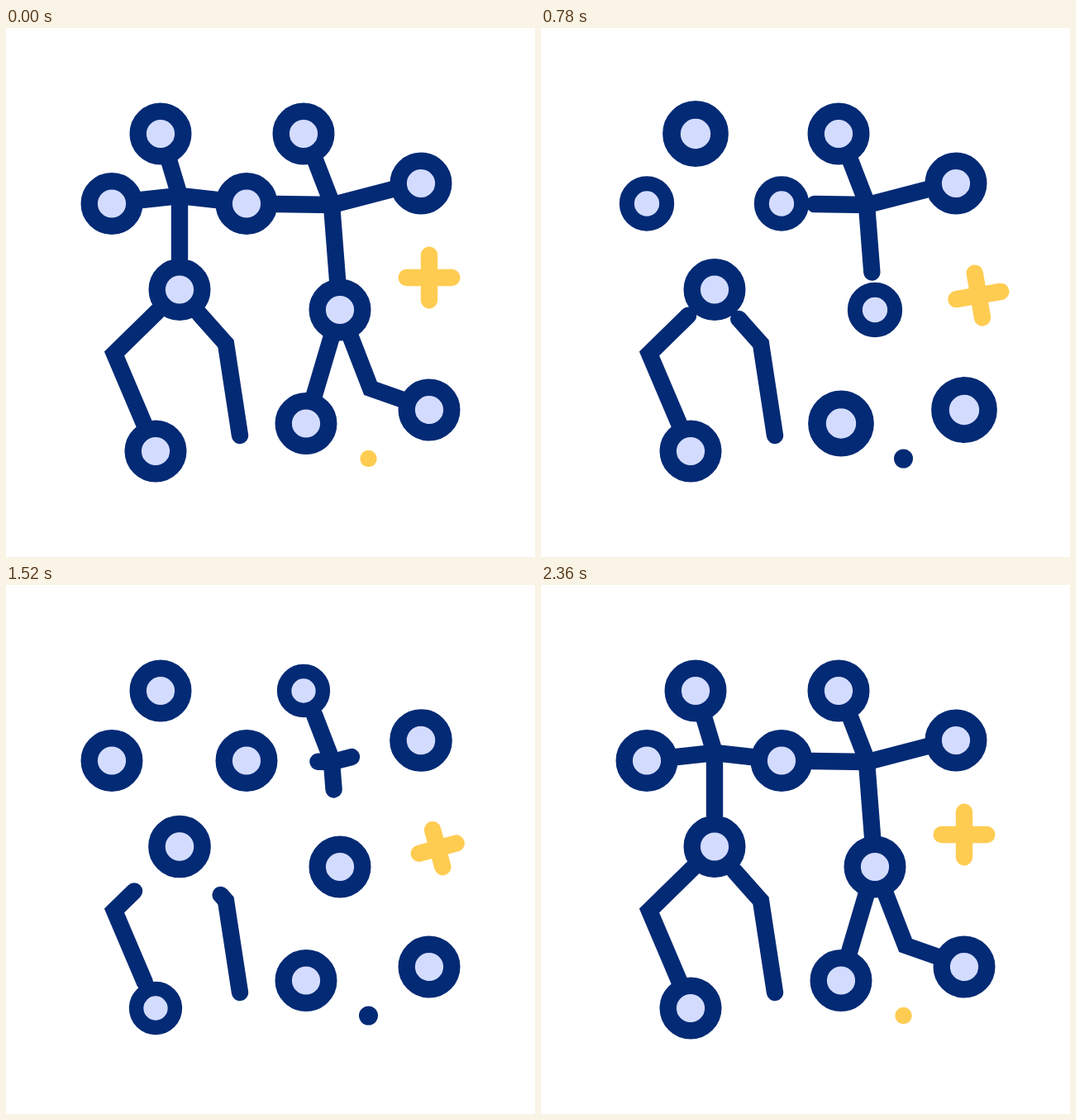
An HTML page for the animation above (3000 ms loop, 640x640 px).

```html
<!DOCTYPE html>
<html lang="en">
<head>
<meta charset="utf-8">
<title>Dancing figures</title>
<style>
  html, body { margin: 0; width: 100%; height: 100%; overflow: hidden; background: #fff; }
  svg { display: block; width: 100%; height: 100%; }
  .limb, .plus { fill: none; stroke-width: 20.4; stroke-linecap: round; stroke-miterlimit: 10; }
  .limb { stroke: #032a75; }
  .plus { stroke: #ffcc52; }
  .node { fill: #d3dcff; stroke: #032a75; stroke-width: 20.4; }
</style>
</head>
<body>
<svg id="stage" viewBox="0 0 640 640"></svg>
<script>
const LOOP = 3000, NAVY = '#032a75', GOLD = '#ffcc52';
const stage = document.getElementById('stage');

function add(tag, attrs, parent = stage) {
  const el = document.createElementNS('http://www.w3.org/2000/svg', tag);
  for (const k in attrs) el.setAttribute(k, attrs[k]);
  if (parent) parent.appendChild(el);
  return el;
}

const smooth = p => p * p * (3 - 2 * p);

// Eased value at time t from [time, value] steps
function track(steps, t) {
  if (t <= steps[0][0]) return steps[0][1];
  for (let i = 1; i < steps.length; i++) {
    const [t0, a] = steps[i - 1], [t1, b] = steps[i];
    if (t < t1) return a + (b - a) * smooth((t - t0) / (t1 - t0));
  }
  return steps[steps.length - 1][1];
}

// Each limb starts at the end that stays; times: retract from/to, grow from/to
const limbs = [
  ['M210 203L196.5 158', [140, 490, 2030, 2360]],
  ['M210 203L164 208', [190, 490, 2020, 2350]],
  ['M210 203L255 208', [190, 490, 2020, 2350]],
  ['M210 279V203', [430, 760, 1745, 2040]],
  ['M168 481L131 394L184 342', [733, 1093, 1267, 1640]],
  ['M283 493L266 382L234 346', [733, 1093, 1267, 1640]],
  ['M373 157L395 214', [930, 1110, 1200, 1420]],
  ['M395 214L328 213', [750, 1000, 1405, 1750]],
  ['M395 214L468 195', [750, 1000, 1390, 1740]],
  ['M394 214L401 304', [730, 1000, 1310, 1820]],
  ['M394 373L373 444', [140, 540, 1745, 2260]],
  ['M417 374L441 436L478 449', [140, 540, 1745, 2260]]
].map(([d, [a, b, c, e]]) => ({
  el: add('path', { class: 'limb', d, pathLength: 1 }),
  steps: [[a, 1], [b, 0], [c, 0], [e, 1]]
}));

// Groups of joints share one pulse: start, smallest, largest, end
const nodes = [
  [[0, 375, 910, 1200], [[187, 128], [363, 478.5], [512, 462]]],
  [[240, 665, 1160, 1490], [[128, 212.5], [291, 212.5], [404, 341]]],
  [[790, 1195, 1745, 2040], [[502, 188], [210, 316.5]]],
  [[1160, 1575, 2110, 2370], [[360, 128], [181, 512]]]
].flatMap(([[a, b, c, e], spots]) => spots.map(([x, y]) => ({
  el: add('circle', { class: 'node', r: 27.3 }),
  x, y,
  steps: [[a, 1], [b, 0.85], [c, 1.1], [e, 1]]
})));

const dot = add('circle', { cx: 438.5, cy: 521 });
const plus = add('path', { class: 'plus' });
const route = add('path', { d: 'M512 302Q516 324 556 333' }, null);
const routeLength = route.getTotalLength();

const travel = [[490, 0], [1070, 1], [1820, 0]];
const arm = [[780, 27.3], [1080, 16], [1820, 27.3]];
const turn = [[490, 0], [740, -11], [1090, 21], [1560, -16], [1980, 0]];

function draw(t) {
  for (const { el, steps } of limbs) {
    const v = track(steps, t);
    el.style.visibility = v > 0 ? 'visible' : 'hidden';
    el.setAttribute('stroke-dasharray', `${v} 2`);
  }
  for (const { el, x, y, steps } of nodes) {
    el.setAttribute('transform', `translate(${x} ${y}) scale(${track(steps, t)})`);
  }
  const dark = t < 2400 && Math.floor(t / 480) % 2 === 1;
  dot.setAttribute('fill', dark ? NAVY : GOLD);
  dot.setAttribute('r', dark ? 11.5 : 10.2);

  const p = route.getPointAtLength(track(travel, t) * routeLength);
  const s = track(arm, t);
  plus.setAttribute('d', `M${-s} 0H${s}M0 ${-s}V${s}`);
  plus.setAttribute('transform', `translate(${p.x} ${p.y}) rotate(${track(turn, t)})`);
}

const start = performance.now();
function tick() {
  draw((performance.now() - start) % LOOP);
  requestAnimationFrame(tick);
}
tick();
</script>
</body>
</html>
```
